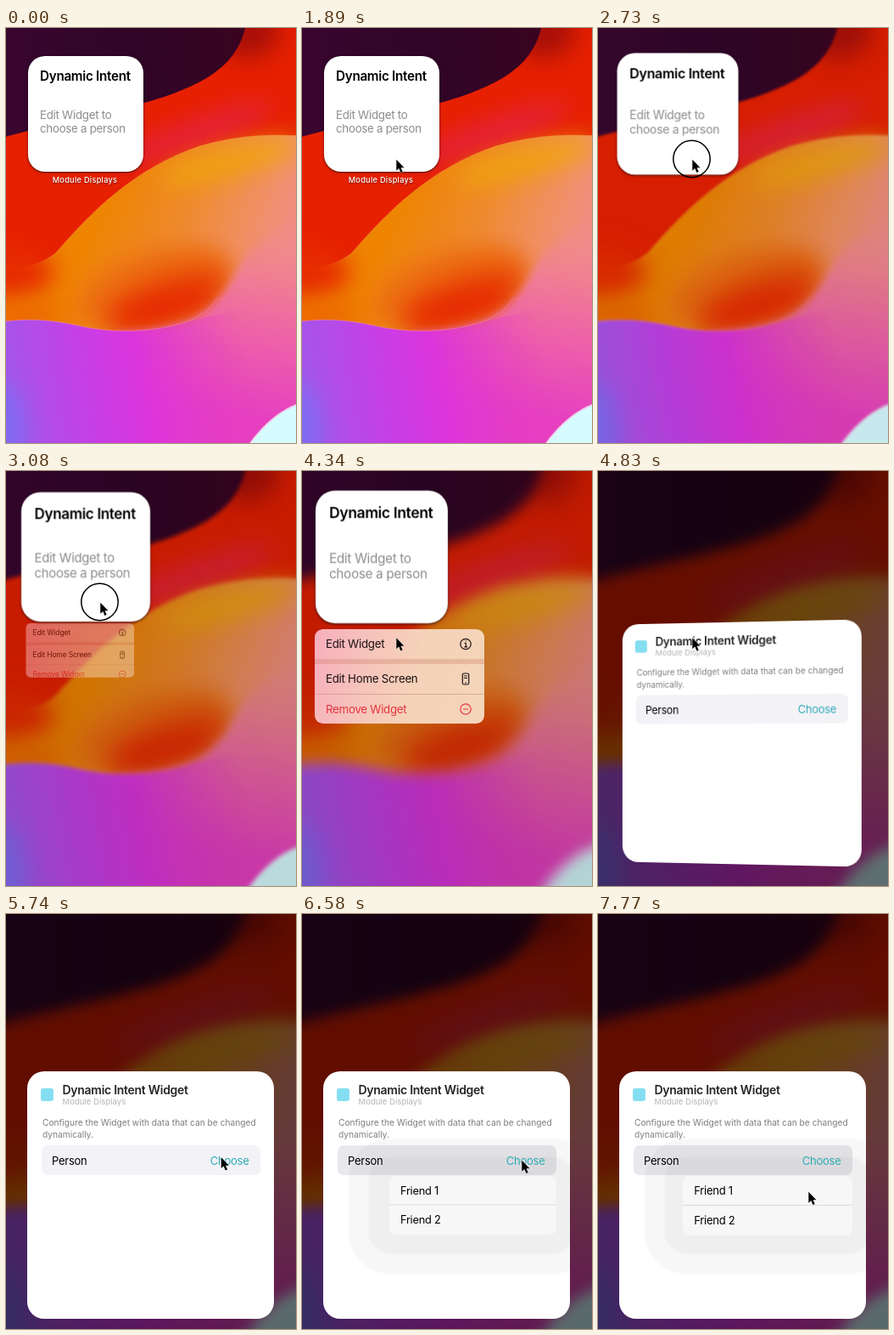
Recreate the animation shown at these times as an HTML page. Size 342 by 488 pixels, loop 8 s.

```html
<!DOCTYPE html>
<html lang="en">
<head>
<meta charset="utf-8">
<title>Configurable widget</title>
<style>
  html, body { margin: 0; width: 100%; height: 100%; overflow: hidden; background: #000; }
  #stage { position: relative; width: 342px; height: 488px; overflow: hidden; }
  svg { position: absolute; display: block; }
  text { font-family: Inter, "Open Sans", sans-serif; font-size: 13.3px; letter-spacing: -.02em; }
  .bold { font-weight: 600; }
  .soft { filter: blur(14px); }
  .edge { filter: blur(.6px); }
  #wall { left: -40px; top: -40px; width: 422px; height: 568px; }
  #widget { left: 25.5px; top: 33px; width: 136px; height: 136px; border-radius: 20px;
            background: #fff; box-shadow: 0 1px 2px rgba(0,0,0,.55), 0 1px 4px rgba(0,0,0,.2); }
  #label { left: 25px; top: 170px; width: 136px; height: 20px; }
  #label text { font-size: 9.2px; font-weight: 500; letter-spacing: .03em; fill: #fff;
                text-anchor: middle; text-shadow: 0 1px 2px rgba(0,0,0,.5); }
  #menu { left: 15px; top: 186px; width: 200px; height: 111px; border-radius: 9px;
          transform-origin: 23px -20px;
          background: linear-gradient(105deg, #f8aebd, #f6c4bb 32%, #f5d2b8 58%, #f4d5b9); }
  #card { left: 25px; top: 185px; width: 291px; height: 291px; border-radius: 20px;
          background: #fff; overflow: hidden; }
  #card text { font-size: 13px; }
  #card .bold { font-size: 14px; }
  #card .sub { font-size: 9.6px; letter-spacing: 0; }
  #card .note { font-size: 10.2px; letter-spacing: 0; }
  #popup { transform-origin: 290px 308px; }
  #pointer { left: 0; top: 0; width: 60px; height: 60px; }
</style>
</head>
<body>
<div id="stage">
  <svg id="wall" viewBox="-40 -40 422 568">
    <defs>
      <linearGradient id="night"><stop offset="0" stop-color="#3c0632"/><stop offset=".55" stop-color="#300528"/><stop offset="1" stop-color="#3a0420"/></linearGradient>
      <linearGradient id="amber" gradientUnits="userSpaceOnUse" x1="120" y1="190" x2="335" y2="285">
        <stop offset="0" stop-color="#ef8400"/><stop offset=".4" stop-color="#ee8a2c"/>
        <stop offset=".7" stop-color="#f09060"/><stop offset="1" stop-color="#f08c90"/>
      </linearGradient>
      <linearGradient id="rose" gradientUnits="userSpaceOnUse" x1="300" y1="215" x2="260" y2="450">
        <stop offset="0" stop-color="#f0908c" stop-opacity="0"/><stop offset=".3" stop-color="#f08090"/>
        <stop offset=".6" stop-color="#ee62a8"/><stop offset="1" stop-color="#e640c0"/>
      </linearGradient>
      <linearGradient id="violet" gradientUnits="userSpaceOnUse" x1="0" y1="440" x2="285" y2="390">
        <stop offset="0" stop-color="#a258ea"/><stop offset=".32" stop-color="#c440e6"/>
        <stop offset=".56" stop-color="#dc34dc"/><stop offset="1" stop-color="#e63cc4" stop-opacity="0"/>
      </linearGradient>
    </defs>
    <rect x="-40" y="-40" width="422" height="568" fill="#e62000"/>
    <ellipse class="soft" cx="222" cy="125" rx="100" ry="18" fill="#e62238" transform="rotate(-20 222 125)"/>
    <ellipse class="soft" cx="285" cy="0" rx="38" ry="36" fill="#a81008"/>
    <path class="edge" fill="url(#night)" d="M-50-50H300L282 0C277 22 264 42 238 58C205 77 172 86 150 91C90 108 30 117-50 142Z"/>
    <path class="edge" fill="url(#amber)" stroke="#f08a50" stroke-opacity=".5" d="M-50 295C10 285 42 280 60 263C102 215 150 166 228 139C278 125 315 123 392 130V540H-50Z"/>
    <ellipse class="soft" cx="-5" cy="287" rx="62" ry="32" fill="#e72c00"/>
    <ellipse class="soft" cx="20" cy="340" rx="50" ry="16" fill="#ec6400"/>
    <ellipse class="soft" cx="265" cy="158" rx="85" ry="15" fill="#f0a40c" transform="rotate(-15 265 158)"/>
    <ellipse class="soft" cx="175" cy="305" rx="95" ry="42" fill="#ec6c10" transform="rotate(-18 175 305)"/>
    <ellipse class="soft" cx="190" cy="318" rx="76" ry="27" fill="#e84608" transform="rotate(-20 190 318)"/>
    <ellipse class="soft" cx="188" cy="329" rx="64" ry="15" fill="#e62400" transform="rotate(-16 188 329)"/>
    <path fill="url(#rose)" style="filter:blur(4px)" d="M392 190C330 225 300 248 281 272C264 300 250 336 205 348C180 354 160 357 130 358V540H392Z"/>
    <path class="edge" fill="url(#violet)" d="M-50 353C10 340 45 341 85 350C130 360 175 358 215 345C250 337 300 322 392 320V540H-50Z"/>
    <path class="edge" fill="none" stroke="#f084b8" stroke-opacity=".6" d="M-50 353C10 340 45 341 85 350C130 360 175 358 215 345Q238 335 250 317"/>
    <ellipse class="soft" cx="-10" cy="475" rx="32" ry="60" fill="#806cf2"/>
    <path class="edge" fill="#d6fbff" stroke="#f0c8e8" stroke-width="1.5" d="M270 540Q280 500 288 488C306 464 325 449 345 442L392 425V540Z"/>
  </svg>

  <svg id="label" viewBox="25 170 136 20"><text x="93" y="182">Module Displays</text></svg>

  <svg id="menu" viewBox="15 186 200 111">
    <rect x="15" y="221" width="200" height="6" fill="#c87860" opacity=".3"/>
    <path d="M15 262.5H215" stroke="#b87060" stroke-opacity=".4"/>
    <g fill="#1c1012">
      <text x="28" y="208">Edit Widget</text>
      <text x="28" y="249.3">Edit Home Screen</text>
      <text x="28" y="284.6" fill="#e5343e">Remove Widget</text>
    </g>
    <g fill="none" stroke="#1c1012" stroke-width="1.2">
      <circle cx="193" cy="203.5" r="6.2"/>
      <path d="M191.5 202.5H193.3V206.8M191.3 206.8H195.2M192.4 200H193.8"/>
      <rect x="189.3" y="238" width="7.4" height="13" rx="1.8"/>
      <path d="M191 241H195M191 243.5H195M192 249H194"/>
      <g stroke="#e5343e"><circle cx="193" cy="280" r="6.2"/><path d="M190 280H196"/></g>
    </g>
  </svg>

  <svg id="widget" viewBox="25.5 33 136 136">
    <text class="bold" x="39.5" y="61.5" style="font-size:15.25px">Dynamic Intent</text>
    <g fill="#8c8c8f">
      <text x="39.5" y="107">Edit Widget to</text>
      <text x="39.5" y="123">choose a person</text>
    </g>
  </svg>

  <svg id="card" viewBox="25 185 291 291">
    <rect x="41" y="205" width="15" height="15" rx="3" fill="#84deef"/>
    <text class="bold" x="66.5" y="211.9" fill="#242426">Dynamic Intent Widget</text>
    <text class="sub" x="66.5" y="224.3" fill="#b4b4b7">Module Displays</text>
    <g fill="#7d7d81">
      <text class="note" x="43" y="248.5">Configure the Widget with data that can be changed</text>
      <text class="note" x="43" y="263">dynamically.</text>
    </g>
    <rect x="42" y="272" width="258" height="35" rx="7" fill="#f2f2f7"/>
    <rect id="rowTint" x="42" y="272" width="258" height="35" rx="7" fill="#000"/>
    <g id="shade" fill="#000" fill-opacity=".032" style="filter:blur(.8px)">
      <rect x="55" y="264" width="290" height="159" rx="48"/>
      <rect x="78" y="285" width="244" height="115" rx="28"/>
    </g>
    <text x="54" y="294.8">Person</text>
    <text x="240.8" y="294.8" fill="#2fabb3">Choose</text>
    <g id="popup">
      <rect x="100" y="308" width="200" height="70" rx="8" fill="#f7f7f8"/>
      <path d="M100 342.5H300" stroke="#dcdcde"/>
      <text x="113.3" y="330.3">Friend 1</text>
      <text x="113.3" y="365.3">Friend 2</text>
    </g>
  </svg>

  <svg id="pointer" viewBox="-30 -30 60 60">
    <circle id="ring" cx="-.5" cy="0" r="21.7" fill="none" stroke="#000" stroke-width="1.5"/>
    <path transform="translate(.3 .8) scale(.88)" d="M0 0V14.6L3.4 11.6L5.8 17.2L8.4 16.1L6 10.7H10.4Z" fill="#000" stroke="#fff" stroke-linejoin="round" paint-order="stroke"/>
  </svg>
</div>
<script>
const LOOP = 8000, STEP = 70;
const el = id => document.getElementById(id);
const [wall, label, menu, widget, card, popup, shade, rowTint, pointer, ring] =
  ['wall', 'label', 'menu', 'widget', 'card', 'popup', 'shade', 'rowTint', 'pointer', 'ring'].map(el);

const mix = (a, b, p) => a + (b - a) * p;
const within = (t, a, b) => t >= a && t < b;
const inOut = u => u < .5 ? 4 * u ** 3 : 1 - 4 * (1 - u) ** 3;
const out = u => 1 - (1 - u) ** 2;

// critically damped spring, 0 to 1
function spring(t, start, rate) {
  const x = Math.max(0, t - start) * rate;
  return 1 - (1 + x) * Math.exp(-x);
}

// piecewise linear value from [time, value] pairs
function track(t, ...keys) {
  if (t <= keys[0][0]) return keys[0][1];
  for (let i = 1; i < keys.length; i++) {
    const [a, va] = keys[i - 1], [b, vb] = keys[i];
    if (t < b) return mix(va, vb, (t - a) / (b - a));
  }
  return keys.at(-1)[1];
}

// pointer moves: start, end, target x, target y, easing
const moves = [
  [770, 1470, 109.5, 155, out],
  [1680, 1890, 111, 154, inOut],
  [3290, 3850, 111, 195.5, inOut],
  [5180, 5890, 259, 289, inOut],
  [7350, 7770, 248, 326, inOut]
];

function pointerAt(t) {
  let x = 166, y = 495;
  for (const [a, b, tx, ty, ease] of moves) {
    const p = ease(Math.min(1, Math.max(0, (t - a) / (b - a))));
    x = mix(x, tx, p);
    y = mix(y, ty, p);
  }
  return [x, y];
}

function place(node, homeX, homeY, size, x, y, width, angle) {
  node.style.transform = `translate(${x - homeX}px,${y - homeY}px) perspective(1000px) rotateY(${angle}deg) scale(${width / size})`;
}

function draw(t) {
  const flip = spring(t, 4340, .0099);
  const p = flip > .997 ? 1 : flip;
  const blur = track(t, [2310, 0], [3080, 2.5], [3500, 8]);
  const dim = mix(track(t, [2310, 1], [3080, .87], [3500, .84]), .42, p);
  wall.style.filter = blur ? `blur(${blur}px) brightness(${dim})` : 'none';

  label.style.opacity = track(t, [2310, 1], [2660, 0]);

  const grow = track(t, [2310, 1], [2800, 1.06], [3080, 1.118], [3290, 1.147]);
  const x = mix(93.5, 170.5, p), y = mix(101, 330.5, p);
  const width = mix(136 * grow, 291, p), angle = 180 * p;
  place(widget, 93.5, 101, 136, x, y, width, angle);
  place(card, 170.5, 330.5, 291, x, y, width, angle - 180);
  widget.style.visibility = angle < 90 ? 'visible' : 'hidden';
  card.style.visibility = angle < 90 ? 'hidden' : 'visible';

  const unfold = track(t, [2940, .3], [3080, .64], [3220, .92], [3360, 1], [4340, 1], [4550, .6]);
  menu.style.opacity = track(t, [2940, 0], [3080, .5], [3290, 1], [4340, 1], [4550, 0]);
  menu.style.transform = `scale(${unfold})`;
  menu.style.clipPath = `inset(0 0 ${(1 - unfold) * 28}% 0 round 9px)`;

  const open = spring(t, 6160, .014);
  popup.style.transform = `scale(${mix(.2, 1, open)})`;
  popup.style.opacity = shade.style.opacity = Math.min(1, open * 1.2);
  rowTint.style.opacity = .04 * open;

  const [px, py] = pointerAt(t);
  pointer.style.transform = `translate(${px - 30}px,${py - 30}px)`;
  const pressed = within(t, 2240, 3220) || within(t, 4200, 4340) || within(t, 6020, 6160);
  ring.style.visibility = pressed ? 'visible' : 'hidden';
}

function tick() {
  const t = performance.now() % LOOP;
  draw(Math.floor(t / STEP) * STEP);
  requestAnimationFrame(tick);
}
tick();
</script>
</body>
</html>
```
